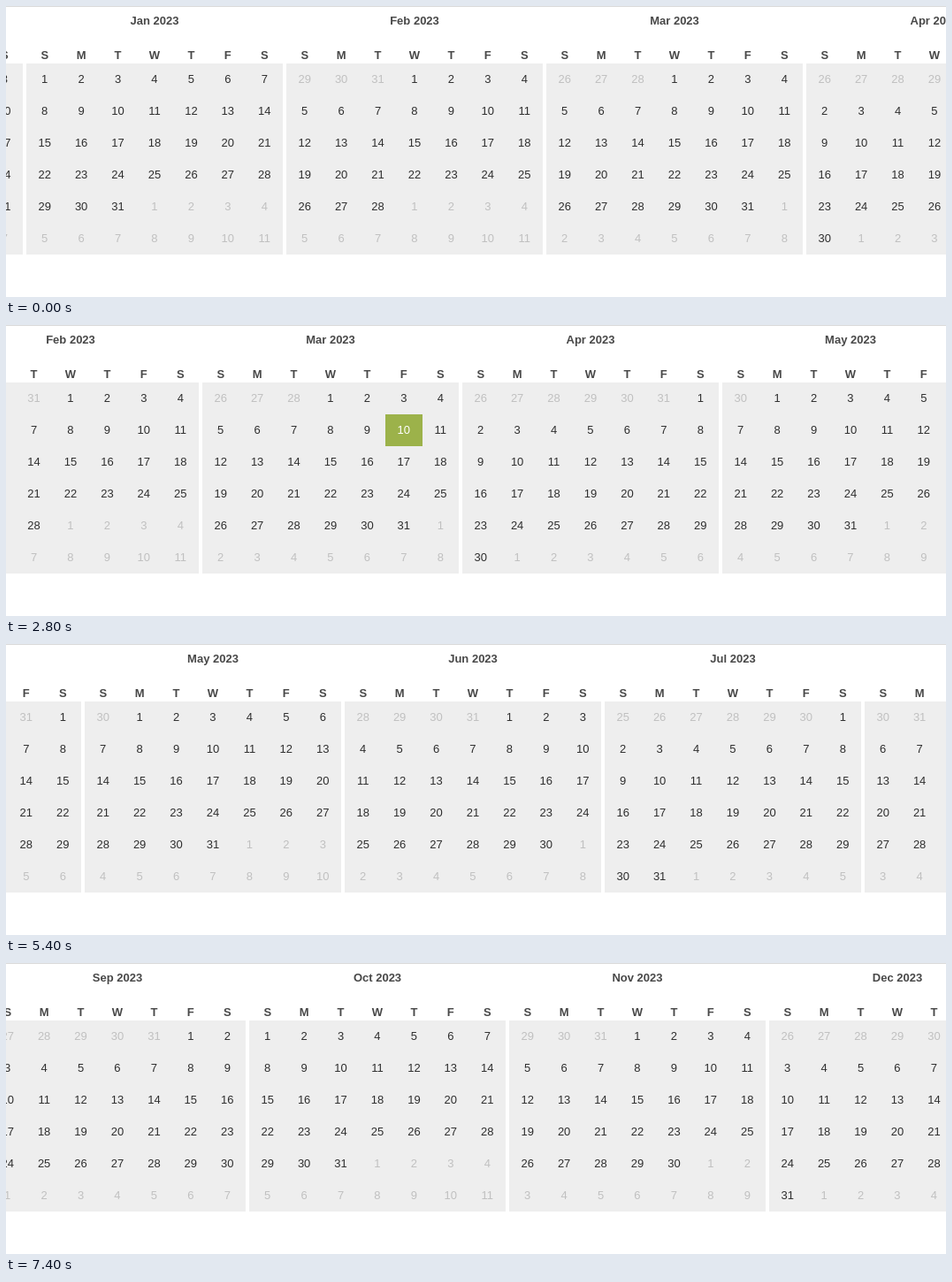
Animation, 1063 px wide and 329 px high, one loop 8 s. Source, as an HTML page:

```html
<!DOCTYPE html>
<html lang="en">
<head>
<meta charset="utf-8">
<title>Scrolling calendar</title>
<style>
  html, body { margin: 0; width: 100%; height: 100%; overflow: hidden; background: #fff; }
  #stage {
    position: relative; width: 1063px; height: 329px; overflow: hidden;
    box-sizing: border-box; background: #fff;
    font: 13px/15px "Liberation Sans", Arial, sans-serif; color: #2e2e2e;
  }
  #stage::after {
    content: ""; position: absolute; left: 0; top: 0; width: 100%; height: 1px; background: #d9d9d9;
  }
  #strip { position: absolute; left: 0; top: 0; }
  .month { position: absolute; top: 0; width: 290px; height: 281px; text-align: center; }
  .title, .weekdays { position: absolute; width: 100%; font-weight: bold; color: #484848; }
  .title { top: 9px; }
  .weekdays { top: 48px; display: flex; }
  .days { position: absolute; top: 65px; width: 100%; height: 216px; background: #eee; display: flex; flex-wrap: wrap; }
  .weekdays span, .days span { width: calc(100% / 7); }
  .days span { height: 36px; line-height: 35px; }
  .days .outside { color: #c0c0c0; }
  .days .selected { background-color: #9cb24a; color: #fff; }
  .days .hover { background-image: linear-gradient(rgba(0, 0, 0, .105), rgba(0, 0, 0, .105)); }
</style>
</head>
<body>
<div id="stage"><div id="strip"></div></div>
<script>
const LOOP = 8000, TICK = 100, PITCH = 294, JAN_LEFT = 23;
const MAR = 2, JUL = 6;
const NAMES = 'Jan Feb Mar Apr May Jun Jul Aug Sep Oct Nov Dec'.split(' ');
const strip = document.getElementById('strip');

function add(parent, tag, className, text = '') {
  const el = document.createElement(tag);
  el.className = className;
  el.textContent = text;
  return parent.appendChild(el);
}

// Builds a six-week month; index 0 is January 2023. Returns its day cells.
function buildMonth(index) {
  const first = new Date(2023, index, 1);
  const month = add(strip, 'div', 'month');
  month.style.left = JAN_LEFT + index * PITCH + 'px';
  add(month, 'div', 'title', NAMES[first.getMonth()] + ' ' + first.getFullYear());
  const weekdays = add(month, 'div', 'weekdays');
  for (const letter of 'SMTWTFS') add(weekdays, 'span', '', letter);
  const days = add(month, 'div', 'days');
  return Array.from({ length: 42 }, (_, i) => {
    const date = new Date(2023, index, 1 - first.getDay() + i);
    const inside = date.getMonth() === first.getMonth();
    return add(days, 'span', inside ? '' : 'outside', date.getDate());
  });
}

const months = {};
for (let i = -1; i < 12; i++) months[i] = buildMonth(i);

const cell = (month, row, col) => months[month][row * 7 + col];
const picked = cell(MAR, 1, 5);
const PICK_FROM = 1600;

// Pointer: [time, hovered cell]
const hovers = [
  [0, null],
  [700, cell(MAR, 4, 6)],
  [800, cell(MAR, 3, 6)],
  [900, cell(MAR, 3, 5)],
  [1000, cell(MAR, 2, 4)],
  [1100, cell(MAR, 1, 4)],
  [1200, picked],
  [1900, cell(MAR, 2, 5)],
  [2000, cell(MAR, 3, 5)],
  [2100, null],
  [4200, cell(JUL, 5, 0)],
  [4300, null]
];

// Swipes: [first step, last step, scroll before, scroll after]
const swipes = [
  [2600, 3000, 0, 511],
  [3600, 4000, 511, 1015],
  [5400, 5800, 1015, 1458],
  [6400, 6700, 1458, 1915],
  [7100, 7400, 1915, 2394]
];

// Quick start, longer slow-down
function ease(p) {
  const q = Math.pow(p, 0.75);
  return q * q * (3 - 2 * q);
}

function scrollAt(t) {
  let x = 0;
  for (const [start, end, from, to] of swipes) {
    if (t < start) break;
    const p = Math.min(1, (t - start + TICK) / (end - start + TICK));
    x = from + (to - from) * ease(p);
  }
  return Math.round(x);
}

let hovered = null;

function render(now) {
  const t = Math.floor((now % LOOP) / TICK) * TICK;
  strip.style.left = -scrollAt(t) + 'px';
  picked.classList.toggle('selected', t >= PICK_FROM);
  const next = hovers.filter(([time]) => time <= t).pop()[1];
  if (next !== hovered) {
    if (hovered) hovered.classList.remove('hover');
    if (next) next.classList.add('hover');
    hovered = next;
  }
}

function frame() {
  render(performance.now());
  requestAnimationFrame(frame);
}
frame();
</script>
</body>
</html>
```
